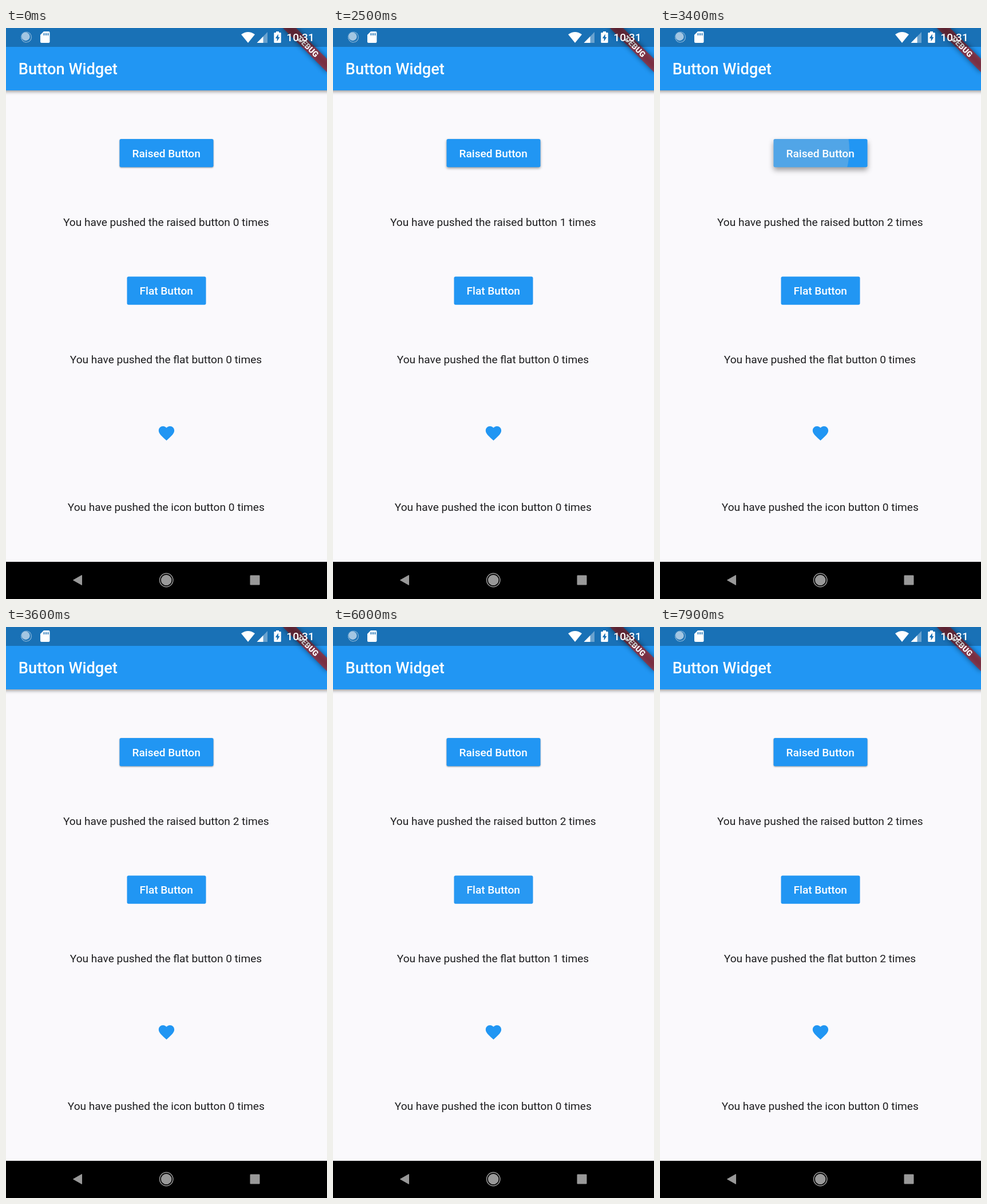
An HTML page that plays this animation: 561x998 px, repeating every 8000 ms.

```html
<!DOCTYPE html>
<html lang="en">
<head>
<meta charset="utf-8">
<title>Button Widget</title>
<style>
  html, body { margin: 0; width: 100%; height: 100%; overflow: hidden; background: #faf9fc; }
  svg { display: block; width: 561px; height: 998px; }
  text { font: 400 19.09px Roboto, sans-serif; fill: #1d1d1f; white-space: pre; }
  .mid { text-anchor: middle; }
  .light { font-weight: 500; fill: #fff; }
  .title { font-size: 27.27px; }
  .banner { font-size: 13.9px; font-weight: 900; }
  .blue { fill: #2196f3; }
  .bar { filter: drop-shadow(0 2.5px 3px rgba(0, 0, 0, .42)); }
</style>
</head>
<body>
<svg viewBox="0 0 561 998">
  <defs>
    <clipPath id="raisedClip"><rect x="198.5" y="194" width="164" height="49.2" rx="2.7"/></clipPath>
    <clipPath id="flatClip"><rect x="211.5" y="434.6" width="138" height="49.2" rx="2.7"/></clipPath>
    <filter id="soft" x="-30%" y="-150%" width="160%" height="400%"><feGaussianBlur stdDeviation="5"/></filter>
  </defs>
  <rect width="561" height="998" fill="#faf9fc"/>

  <!-- App bar and corner banner -->
  <rect class="blue bar" x="-20" y="-20" width="601" height="129"/>
  <text class="light title" x="21.8" y="81">Button Widget</text>
  <g transform="translate(561 0) rotate(45)">
    <rect x="-54.5" y="38.2" width="109" height="16.4" opacity=".5" filter="url(#soft)"/>
    <rect x="-54.5" y="38.2" width="109" height="16.4" fill="#b71c1c" opacity=".627"/>
    <text class="light banner mid" y="51.4">DEBUG</text>
  </g>

  <!-- Status bar -->
  <rect width="561" height="33" opacity=".25"/>
  <g fill="#fff">
    <circle cx="35.5" cy="16" r="8.8" fill="none" stroke="#fff" stroke-width="1.6" stroke-dasharray="1.4 1.1" opacity=".65"/>
    <circle cx="34.5" cy="15" r="7.2" opacity=".6"/>
    <path d="M66 6H74.5Q76.5 6 76.5 8V24Q76.5 26 74.5 26H62Q60 26 60 24V12Z"/>
    <path d="M66.5 9v4M70 9v4M73.5 9v4" stroke="#1970b6" stroke-width="1.7"/>
    <path d="M411 11.2Q423 2.6 435 11.2L423 26Z"/>
    <path d="M457 7V26H438.5Z" opacity=".35"/>
    <path d="M449.5 14.7V26H438.5Z"/>
    <path d="M472 8V6H477V8H479.5Q480.7 8 480.7 9.2V24.8Q480.7 26 479.5 26H469.5Q468.3 26 468.3 24.8V9.2Q468.3 8 469.5 8Z"/>
    <path d="M475.8 10.5L470.8 18H473.6V23.5L478.4 16H475.8Z" fill="#1970b6"/>
  </g>
  <text class="light" x="490.3" y="23.3">10:31</text>

  <!-- Buttons -->
  <rect id="raised" class="blue" x="198.5" y="194" width="164" height="49.2" rx="2.7"/>
  <g clip-path="url(#raisedClip)"><circle id="raisedRipple" cx="211" cy="213" fill="#c8c8c8"/></g>
  <text class="light mid" x="280.2" y="225.6">Raised Button</text>
  <rect class="blue" x="211.5" y="434.6" width="138" height="49.2" rx="2.7"/>
  <rect id="tint" x="211.5" y="434.6" width="138" height="49.2" rx="2.7" fill="#bcbcbc" opacity="0"/>
  <g clip-path="url(#flatClip)"><circle id="flatRipple" cx="290" cy="466" fill="#c8c8c8"/></g>
  <text class="light mid" x="280.2" y="466.2">Flat Button</text>
  <path class="blue" transform="translate(264.1 691.9) scale(1.364)" d="M12 21.35l-1.45-1.32C5.4 15.36 2 12.28 2 8.5 2 5.42 4.42 3 7.5 3c1.74 0 3.41.81 4.5 2.09C13.09 3.81 14.76 3 16.5 3 19.58 3 22 5.42 22 8.5c0 3.78-3.4 6.86-8.55 11.54L12 21.35z"/>

  <!-- Counters -->
  <text id="raisedText" class="mid" x="279.8" y="345.7"></text>
  <text id="flatText" class="mid" x="279.5" y="586.3"></text>
  <text class="mid" x="279.8" y="843.5">You have pushed the icon button 0 times</text>

  <!-- Navigation bar -->
  <rect y="933" width="561" height="65"/>
  <g fill="#999">
    <path d="M117.5 965L132.5 956.5V973.5Z" stroke="#999" stroke-linejoin="round"/>
    <circle cx="280.2" cy="965" r="11.7" fill="none" stroke="#999" stroke-width="1.5"/>
    <circle cx="280.2" cy="965" r="9.3"/>
    <rect x="426.5" y="956.5" width="17" height="17" rx="1.2"/>
  </g>
</svg>
<script>
  const LOOP = 8000, STEP = 100;
  const $ = id => document.getElementById(id);

  // Each tap: start, length and moment of counting, in ms
  const raisedTaps = [
    { start: 2500, length: 200, count: 2500 },
    { start: 3200, length: 400, count: 3300 }
  ];
  const flatTaps = [
    { start: 5100, length: 300, count: 5200 },
    { start: 6000, length: 500, count: 6200 }
  ];

  const activeTap = (taps, t) => taps.find(p => t >= p.start && t < p.start + p.length);
  const counted = (taps, t) => taps.filter(p => t >= p.count).length;

  function ripple(circle, tap, t) {
    const age = tap ? (t - tap.start) / 100 : 0;
    const left = tap ? tap.length / 100 - age : 0;
    circle.setAttribute("r", 3 + 58.5 * age);
    circle.setAttribute("opacity", 0.29 * Math.min(1, age, left / 2));
    return Math.min(1, (age + 0.5) / 2, left / 2);
  }

  function say(id, name, n) {
    const line = `You have pushed the ${name} button ${n} times`;
    if ($(id).textContent !== line) $(id).textContent = line;
  }

  function draw(now) {
    const t = Math.floor((now % LOOP) / STEP) * STEP;
    const lift = ripple($("raisedRipple"), activeTap(raisedTaps, t), t);
    const height = 2 + 6 * lift;
    $("raised").style.filter =
      `drop-shadow(0 ${height * 0.65}px ${height * 0.6}px rgba(0, 0, 0, .38))`;

    const flatTap = activeTap(flatTaps, t);
    ripple($("flatRipple"), flatTap, t);
    const lingering = t >= 6500 && t < 7900;
    $("tint").setAttribute("opacity", flatTap || lingering ? 0.04 : 0);

    say("raisedText", "raised", counted(raisedTaps, t));
    say("flatText", "flat", counted(flatTaps, t));
  }

  const origin = performance.now();
  function tick() {
    draw(performance.now() - origin);
    requestAnimationFrame(tick);
  }
  tick();
</script>
</body>
</html>
```
